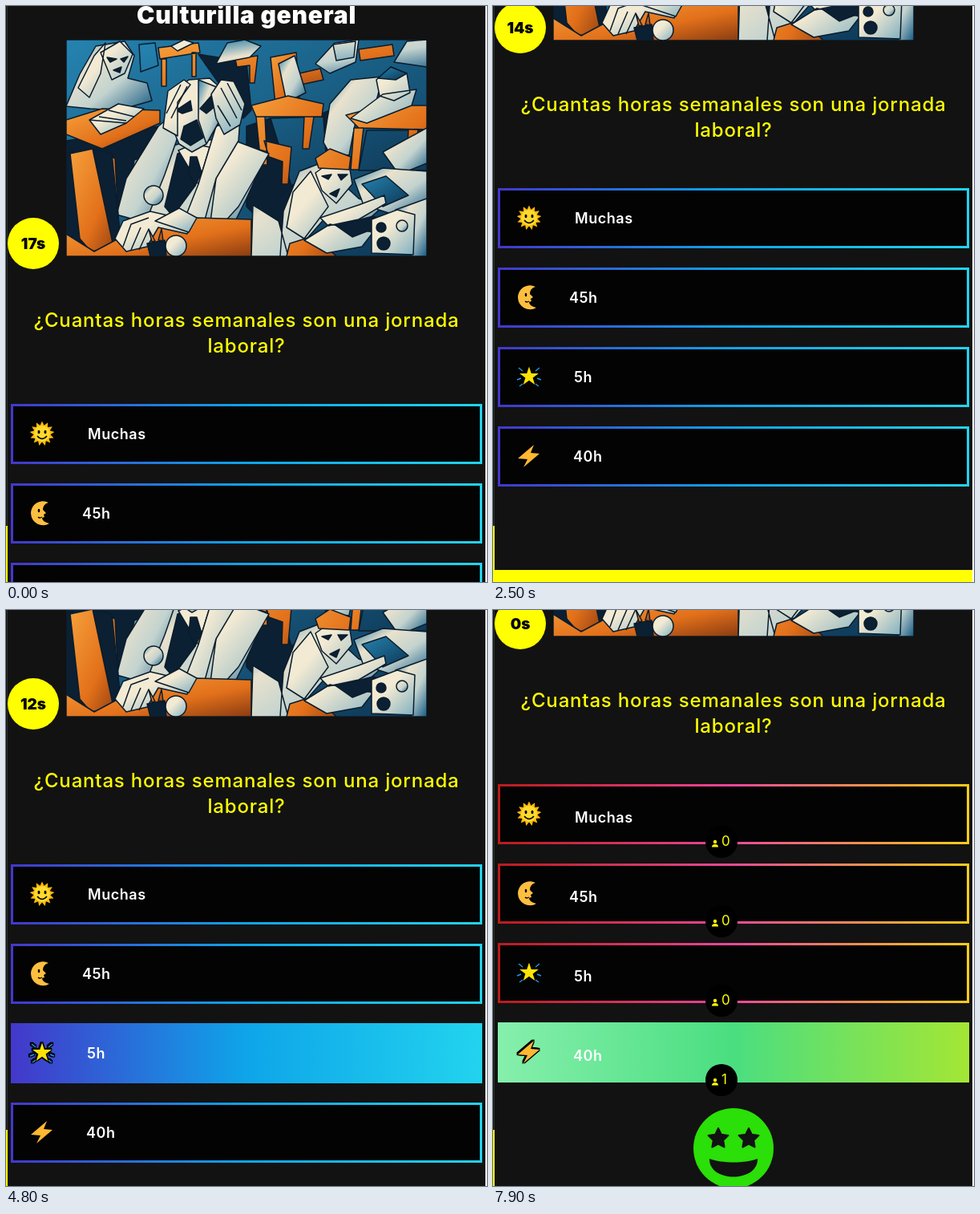
Write an HTML page that moves like this. It is 600x718 px and loops after 8 s.

```html
<!DOCTYPE html>
<html lang="es">
<meta charset="utf-8">
<title>Culturilla general</title>
<style>
  html, body { margin: 0; height: 100%; overflow: hidden; background: #121212; }
  svg { display: block; width: 600px; height: 718px; }
  text { font-family: Inter, sans-serif; }
  .title { font: 900 30px Inter, sans-serif; letter-spacing: .025em; fill: #fff; }
  .question { font: 500 24px Inter, sans-serif; letter-spacing: .034em; fill: #ff0; }
  .timer { font: 900 19px Inter, sans-serif; }
  .label { font: 600 18px Inter, sans-serif; letter-spacing: .03em; fill: #fff; }
  .votes { font: 400 17px Inter, sans-serif; fill: #ff0; }
  .mid { text-anchor: middle; }
  .icon { filter: drop-shadow(1.2px 0 #000) drop-shadow(-1.2px 0 #000) drop-shadow(0 1.2px #000) drop-shadow(0 -1.2px #000); }
  #art { stroke: #0a1c2c; stroke-width: 1.5; stroke-linejoin: round; }
  .c { fill: url(#cream); } .w { fill: url(#pale); } .o { fill: url(#orange); }
  .b { fill: url(#blue); } .d { fill: #0b2033; } .l { fill: none; }
</style>

<svg viewBox="0 0 600 718">
  <defs>
    <linearGradient id="choice"><stop stop-color="#4338ca"/><stop offset=".5" stop-color="#0ea5e9"/><stop offset="1" stop-color="#22d3ee"/></linearGradient>
    <linearGradient id="wrong"><stop stop-color="#b91c1c"/><stop offset=".5" stop-color="#ec4899"/><stop offset="1" stop-color="#facc15"/></linearGradient>
    <linearGradient id="right"><stop stop-color="#86efac"/><stop offset=".5" stop-color="#4ade80"/><stop offset="1" stop-color="#a3e635"/></linearGradient>
    <linearGradient id="cream" x2="1" y2="1"><stop stop-color="#2b7fa9"/><stop offset=".3" stop-color="#e9e2cd"/><stop offset=".6" stop-color="#c3d3cf"/><stop offset="1" stop-color="#155a83"/></linearGradient>
    <linearGradient id="pale" x2="1" y2="1"><stop offset=".4" stop-color="#f3ead3"/><stop offset="1" stop-color="#7fafc0"/></linearGradient>
    <linearGradient id="orange" x2="1" y2="1"><stop stop-color="#f6a03c"/><stop offset=".6" stop-color="#e2701a"/><stop offset="1" stop-color="#8a3c12"/></linearGradient>
    <linearGradient id="blue" x2="1" y2="1"><stop stop-color="#2583b0"/><stop offset="1" stop-color="#0d3654"/></linearGradient>
    <clipPath id="frame"><path d="M75 42H525V312H75Z"/></clipPath>
  </defs>

  <path fill="#121212" d="M0 0H600V718H0Z"/>
  <g id="page">
    <text class="title mid" x="300" y="22">Culturilla general</text>

    <g id="art" clip-path="url(#frame)">
      <path class="b" d="M75 42H525V312H75Z"/>
      <path class="d" d="M75 168 190 150 215 190 150 262 75 200ZM300 150 330 140 362 240 340 290 300 250ZM380 140 404 130 420 205 386 190ZM240 60 300 70 306 130 296 140Z"/>
      <path class="b" d="M330 140 396 138 400 200 356 224ZM450 155 525 155 525 205 440 205ZM166 48 186 46 190 74 168 82Z"/>

      <!-- back row -->
      <path class="c" d="M75 125 92 85 112 50 148 44 160 62 152 90 176 96 182 118 140 130 105 128Z"/>
      <path class="w" d="M118 58 142 44 158 60 148 84 132 92ZM90 102 110 62 124 46 118 84 104 114Z"/>
      <path class="d" d="M126 64 138 66 130 70ZM143 66 152 63 147 70ZM134 80 144 76 142 83Z"/>
      <path class="o" d="M75 142 120 128 192 130 192 146 120 178 75 160Z"/>
      <path class="w" d="M104 142 140 122 172 128 150 146 118 160Z"/>
      <path class="l" d="M104 142 150 146M128 130 160 138M116 138 150 143"/>
      <path class="o" d="M190 52 240 46 242 58 192 66ZM194 66H200V100H194ZM232 58H237V88H232ZM286 66 314 62 310 96 304 96 304 74 288 76ZM366 84 392 78 396 92 368 98ZM440 54 482 48 484 62 442 68Z"/>
      <path class="c" d="M262 72 276 46 298 42 318 50 304 64ZM386 72 410 46 440 42 436 70 404 84ZM484 70 500 44 525 42 525 76Z"/>
      <path class="w" d="M206 50 222 42 234 46 214 56ZM408 48 436 44 434 64 412 68Z"/>

      <!-- middle desks -->
      <path class="o" d="M330 64 362 58 366 116 336 122Z"/>
      <path class="c" d="M340 72 360 62 374 108 350 120Z"/>
      <path class="o" d="M306 124 352 112 396 122 394 138 312 138ZM312 138H323L326 198H318ZM372 138H384L378 178H370ZM322 168 356 176 352 222H344L345 194 328 188Z"/>
      <path class="c" d="M396 170 404 122 430 92 470 88 462 118 438 134 428 186 404 184Z"/>
      <path class="o" d="M424 136 470 124 525 124 525 154 440 152ZM434 152H446L440 204H430ZM502 154H514L510 190H500Z"/>
      <path class="w" d="M430 140 470 110 512 104 506 124 450 146ZM462 92 480 76 500 84 504 108 484 118 466 112Z"/>
      <path class="b" d="M464 90 480 76 500 84 486 92Z"/>
      <path class="c" d="M470 182 525 152 525 196 490 210Z"/>

      <!-- central worker -->
      <path class="c" d="M160 192 215 172 270 165 326 182 300 240 270 300 180 285 150 250Z"/>
      <path class="d" d="M214 184 226 180 236 224 208 262 198 250Z"/>
      <path class="w" d="M215 180 234 172 254 176 240 222ZM270 162 328 184 290 250 252 292 262 215Z"/>
      <path class="d" d="M230 188 238 188 244 208 236 224 228 208Z"/>
      <path class="c" d="M190 150 214 130 214 164 198 210 174 270 138 260 150 215Z"/>
      <path class="w" d="M262 150 292 140 290 168 262 215 240 296 214 288 240 222Z"/>
      <path class="w" d="M203 142 210 108 228 92 254 90 270 104 268 140 250 172 232 182 216 172Z"/>
      <path class="c" d="M240 92 270 104 268 140 250 172 240 142Z"/>
      <path class="d" d="M212 130 230 118 232 130 220 134ZM242 128 256 112 262 124 250 134ZM222 150 238 142 246 164 230 174 218 166Z"/>
      <path class="w" d="M196 152 202 106 222 92 230 98 214 120 214 162ZM256 110 268 92 284 94 298 122 292 148 272 160 262 140Z"/>
      <path class="l" d="M200 134 218 98M206 140 226 100M264 124 280 150M268 102 288 140M276 96 294 130"/>

      <!-- front desk -->
      <path class="d" d="M75 184 84 180 112 306 75 290Z"/>
      <path class="o" d="M80 184 108 178 136 190 142 300 106 306 92 290Z"/>
      <path class="d" d="M108 178 132 184 144 300 134 300Z"/>
      <path class="o" d="M140 290 236 264 306 266 306 312 75 312 75 284 110 306Z"/>
      <path class="w" d="M136 290 146 268 180 256 232 268 226 284 190 276 176 300 150 306Z"/>
      <path class="l" d="M146 300 156 272 178 264M156 304 168 276M166 304 178 278"/>
      <path class="d" d="M176 296 198 292 200 312 180 312Z"/>
      <path class="o" d="M182 294 178 278 186 293ZM190 292 194 278 196 293Z"/>
      <circle class="w" cx="212" cy="299" r="13"/>
      <circle class="c" cx="184" cy="236" r="12"/>
      <path class="w" d="M186 268 216 252 238 264 228 282Z"/>

      <!-- right worker -->
      <path class="c" d="M308 248 340 268 352 312 306 312ZM346 256 366 206 392 196 440 240 470 250 450 268 400 262 356 312 342 312Z"/>
      <path class="w" d="M358 232 380 206 402 250 372 290 350 276ZM386 208 400 198 428 198 432 222 412 246 394 230Z"/>
      <path class="o" d="M386 190 404 178 430 188 428 204 390 202ZM354 296 386 286 412 312 350 312Z"/>
      <path class="d" d="M394 212 406 210 402 216ZM414 210 426 210 418 217ZM404 234 416 228 412 238Z"/>
      <path class="c" d="M434 216 470 202 525 206 525 250 490 262 446 248Z"/>
      <path class="b" d="M444 222 474 212 502 236 470 250Z"/>
      <path class="w" d="M372 292 404 272 458 282 444 300 400 308ZM392 264 440 248 472 236 474 246 440 266 402 274Z"/>
      <path class="d" d="M412 274 458 262 478 270 432 288Z"/>
      <path class="c" d="M486 254 525 240 525 312 506 312Z"/>
      <path class="w" d="M456 266 488 254 510 260 508 310 456 308Z"/>
      <circle class="d" cx="468" cy="276" r="6"/><circle class="d" cx="471" cy="296" r="8"/><circle class="c" cx="494" cy="274" r="7"/>
    </g>

    <circle cx="34" cy="296" r="32" fill="#ff0"/>
    <text id="timer" class="timer mid" x="34" y="303"></text>
    <text class="question mid" x="300" y="400">¿Cuantas horas semanales son una jornada</text>
    <text class="question mid" x="300" y="432">laboral?</text>
    <g id="cards"></g>
    <path id="footer" fill="#ff0" d="M2 972H598V1172H2Z"/>
    <g id="smiley" transform="translate(300 950)">
      <circle r="50" fill="#2bdf08"/>
      <path fill="#121212" d="M-30 13C-14 19 14 19 30 13C31 43 -31 43 -30 13Z"/>
    </g>
  </g>
  <path fill="#2a332a" d="M1 0H2V648H1Z"/>
  <path fill="#ff0" d="M0 648H2V718H0Z"/>
  <path fill="#fff" d="M598 0H600V718H598Z"/>
</svg>

<script>
const $ = id => document.getElementById(id);

const star = (points, outer, inner) => 'M' + Array.from({ length: points * 2 }, (_, i) => {
  const r = i % 2 ? inner : outer, a = i * Math.PI / points - Math.PI / 2;
  return `${(r * Math.cos(a)).toFixed(1)} ${(r * Math.sin(a)).toFixed(1)}`;
}).join('L') + 'Z';

const sun = `<path fill="#f9b80e" d="${star(13, 15.5, 10.5)}"/><circle r="10" fill="#ffd92e"/>
  <ellipse cx="-4" cy="-2" rx="1.5" ry="2.2"/><ellipse cx="4" cy="-2" rx="1.5" ry="2.2"/>
  <path d="M-6 3Q0 10 6 3" fill="none" stroke="#000" stroke-width="1.5"/>`;
const moon = `<path fill="#fdbf3f" d="M8-13A15 15 0 1 0 9 13Q0 11 0 6L3 5 2 2 5 0 1-4Q1-11 8-13Z"/>
  <ellipse cx="-4" cy="-3" rx="1.3" ry="2.2"/><path d="M-5 5Q-3 7 0 5" fill="none" stroke="#000" stroke-width="1.3"/>`;
const glow = `<path fill="none" stroke="#1e9be0" stroke-width="1.5" d="M-8-7-13-11M8-7 13-11M-10 2-15 4M10 2 15 4M-8 9-12 12M8 9 12 12"/>
  <path fill="#fde206" d="${star(5, 12.5, 4.8)}"/>`;
const bolt = `<path fill="#ffb832" d="M6-14-14 3-2 4-7 14 13-3 2-4Z"/>`;

const options = [
  { text: 'Muchas', x: 102, icon: sun, votes: 0 },
  { text: '45h', x: 95, icon: moon, votes: 0 },
  { text: '5h', x: 101, icon: glow, votes: 0 },
  { text: '40h', x: 100, icon: bolt, votes: 1 },
];
const correct = 3;

$('cards').innerHTML = options.map(({ text, x, icon, votes }, i) => `
  <g transform="translate(0 ${496 + 99 * i})">
    <rect class="box" x="7.5" y="1.5" width="585" height="72" stroke-width="3"/>
    <g class="icon" transform="translate(45 37)">${icon}</g>
    <text class="label" x="${x}">${text}</text>
    <g class="badge">
      <circle cx="285" cy="72" r="20"/>
      <circle cx="277" cy="72" r="2.2" fill="#ff0"/><path fill="#ff0" d="M273 78.500Q273 75 277 75T281 78.500Z"/>
      <text class="votes" x="285" y="77">${votes}</text>
    </g>
  </g>`).join('');
$('smiley').innerHTML += [-19, 19].map(x =>
  `<path transform="translate(${x} -12)" fill="#121212" stroke="#121212" stroke-width="2" stroke-linejoin="round" d="${star(5, 13, 6.5)}"/>`).join('');

const boxes = document.querySelectorAll('.box');
const labels = document.querySelectorAll('.label');
const badges = document.querySelectorAll('.badge');
const show = (el, on) => el.setAttribute('visibility', on ? 'visible' : 'hidden');

// Wheel notches: start, distance, progress at each 100 ms tick
const ease = [.23, .69, 1];
const wheel = [
  [1500, 100, [.08, .4, .85, 1]], [2000, 100, ease], [2400, 100, ease], [2800, 79, ease],
  [3600, -100, [.5, 1]], [3900, -100, ease], [7700, 100, ease],
];
const scrollAt = t => wheel.reduce((sum, [start, distance, curve]) =>
  t < start ? sum : sum + distance * (curve[(t - start) / 100] ?? 1), 0);

// Pointer path: time, hovered card (-1 for none)
const hovers = [[0, -1], [4600, 0], [4700, 1], [4800, 2], [4900, 3], [5200, 2], [5300, 1], [5400, 2], [5600, -1], [5900, 3]];
const RESULT = 7100;

function render(now) {
  const t = Math.floor(now % 8000 / 100) * 100;
  const done = t >= RESULT;
  const hovered = hovers.findLast(([time]) => time <= t)[1];
  const seconds = done ? 0 : t < 600 ? 17 : 16 - Math.floor((t - 600) / 900 + (t >= 7000 ? .01 : 0));

  $('page').setAttribute('transform', `translate(0 ${-Math.round(scrollAt(t))})`);
  $('timer').textContent = seconds + 's';
  boxes.forEach((box, i) => {
    const paint = `url(#${!done ? 'choice' : i === correct ? 'right' : 'wrong'})`;
    const filled = done ? i === correct : i === hovered;
    box.setAttribute('stroke', paint);
    box.setAttribute('fill', filled ? paint : '#030303');
    labels[i].setAttribute('y', done ? 48 : 43.5);
    show(badges[i], done);
  });
  show($('footer'), !done);
  show($('smiley'), done);
}

(function frame() {
  render(performance.now());
  requestAnimationFrame(frame);
})();
</script>
</html>
```
